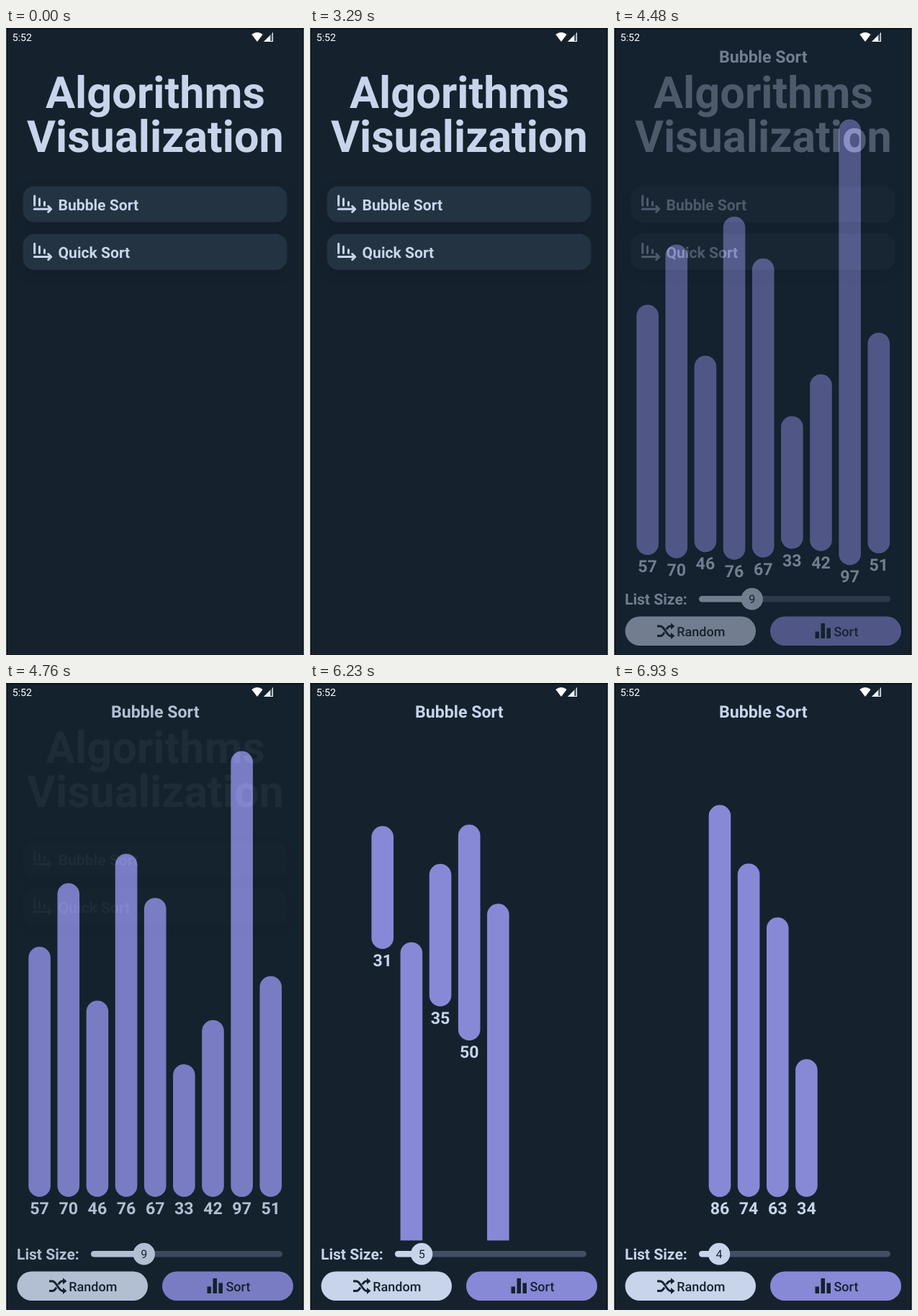
An HTML page for the animation above (8 s loop, 414x870 px).

```html
<!DOCTYPE html>
<html lang="en">
<head>
<meta charset="utf-8">
<title>Algorithms Visualization</title>
<style>
  html, body { margin: 0; width: 100%; height: 100%; overflow: hidden; background: #15222e; }
  svg { display: block; width: 414px; height: 870px; font-family: Roboto, Arial, sans-serif; text-rendering: geometricPrecision; }
  .bg { fill: #15222e; }
  .bold { font-weight: 700; fill: #c8d4ea; }
  .mid { text-anchor: middle; }
  .title { font-size: 61.2px; }
  .head, .value { font-size: 23.2px; }
  .row { font-size: 21.1px; }
  .card { fill: #243342; filter: drop-shadow(0 6px 7px rgba(8, 14, 24, .25)); }
  .icon { fill: none; stroke: #c8d4ea; stroke-width: 3; stroke-linecap: round; stroke-linejoin: round; }
  .btn { font-size: 18px; font-weight: 500; fill: #18222f; }
  .light { fill: #c8d4ea; }
  .accent { fill: #8789d7; }
  .dark { fill: #15222e; }
</style>
</head>
<body>
<svg viewBox="0 0 414 870">
  <defs>
    <clipPath id="area"><rect y="60" width="414" height="713.5"/></clipPath>
    <path id="chart" d="M39.700 233V246M46.500 237V246M53.500 241.500V246M39.300 251.300H62M58.700 247.300L62.700 251.300L58.700 255.300"/>
  </defs>

  <rect class="bg" width="414" height="870"/>

  <g id="home">
    <text class="bold title mid" x="207.400" y="111">Algorithms</text>
    <text class="bold title mid" x="207.400" y="172">Visualization</text>
    <rect class="card" x="23.500" y="219.500" width="367" height="50" rx="16"/>
    <rect class="card" x="23.500" y="285.700" width="367" height="50" rx="16"/>
    <use class="icon" href="#chart"/>
    <use class="icon" href="#chart" y="66.200"/>
    <text class="bold row" x="72.500" y="253">Bubble Sort</text>
    <text class="bold row" x="72.500" y="319.200">Quick Sort</text>
  </g>

  <g id="sorter" opacity="0">
    <rect class="bg" width="414" height="870"/>
    <text class="bold head mid" x="207.200" y="48">Bubble Sort</text>
    <g id="bars" clip-path="url(#area)"></g>

    <text class="bold row" x="15" y="800">List Size:</text>
    <rect x="118" y="788" width="266" height="8.500" rx="4.250" fill="#434e65"/>
    <rect id="fill" class="light" x="118" y="788" height="8.500" rx="4.250"/>
    <circle id="thumb" class="light" cy="792.300" r="15.200"/>
    <text id="size" class="dark mid" y="798" font-size="16"></text>

    <rect class="light" x="15.500" y="816.500" width="181.500" height="40.500" rx="20.250"/>
    <g fill="none" stroke="#18222f" stroke-width="2.900">
      <path d="M60 830H64.500C70 830 73 843.500 78.500 843.500H81M60 843.500H64.500C67 843.500 68.700 841 70 838.700M72.700 834.600C74.200 832 76 830 78.500 830H81"/>
      <path fill="#18222f" stroke="none" d="M79 825.500L84.500 830L79 834.500ZM79 839L84.500 843.500L79 848Z"/>
    </g>
    <text class="btn" x="87.300" y="843.500">Random</text>

    <rect class="accent" x="217" y="816.500" width="182" height="40.500" rx="20.250"/>
    <path class="dark" d="M279.500 837.500h5.500v9.500h-5.500zM287.500 826h5.500v21h-5.500zM295.500 832.500h5.500v14.500h-5.500z"/>
    <text class="btn" x="305.500" y="843.500">Sort</text>
  </g>

  <g fill="#fff">
    <text x="8.700" y="18.300" font-size="14.200">5:52</text>
    <path d="M341.300 9Q349 3 356.700 9L349 19Z"/>
    <path d="M371 6V19H358Z" opacity=".3"/>
    <path d="M367 10V19H358ZM370 6.500H371V19H367V18H370Z"/>
  </g>

  <path d="M0 1H414M1.500 0V870M412.500 0V870" stroke="#05090d" fill="none"/>
  <path d="M.5 1V870M413.500 1V870" stroke="#555c60"/>
</svg>

<script>
const LOOP = 8000, STEP = 70, FLOOR = 713, PITCH = 40.15, WIDTH = 30.6;
const STIFF = 0.023;

// Each list takes effect at its time; bars resize at once and glide to their new places.
const lists = [
  { at: 4276, v: [57, 70, 46, 76, 67, 33, 42, 97, 51] },
  { at: 5950, v: [80, 88, 72, 84, 31, 65, 70, 58] },
  { at: 6020, v: [62, 45, 90, 53, 71, 49, 82] },
  { at: 6090, v: [85, 57, 74, 85, 67, 38] },
  { at: 6230, v: [31, 78, 35, 50, 88] },
  { at: 6510, v: [86, 74, 63, 34] }
];

const $ = id => document.getElementById(id);
const height = v => 6.79 * v - 40;
const slot = (i, n) => 207.2 + (i - (n - 1) / 2) * PITCH;
const rest = ms => ms <= 0 ? 1 : (1 + STIFF * ms) * Math.exp(-STIFF * ms);

function make(tag, cls, parent) {
  const el = document.createElementNS('http://www.w3.org/2000/svg', tag);
  el.setAttribute('class', cls);
  return parent.appendChild(el);
}

function set(el, attrs) {
  for (const k in attrs) el.setAttribute(k, attrs[k]);
}

const bars = lists[0].v.map(() => {
  const g = make('g', '', $('bars'));
  const body = make('rect', 'accent', g);
  set(body, { x: -WIDTH / 2, width: WIDTH, rx: WIDTH / 2 });
  return { g, body, label: make('text', 'bold value mid', g) };
});

function place(i, t, last) {
  let x = slot(i, lists[0].v.length), y = FLOOR;
  for (let k = 0; k <= last; k++) {
    const { at, v } = lists[k];
    const end = k < last ? lists[k + 1].at : t;
    const r = rest(end - at);
    const tx = slot(i, v.length), ty = FLOOR - height(v[i]);
    x = tx + (x - tx) * r;
    y = ty + (y - ty) * r;
  }
  return [x, y];
}

function draw(t) {
  const u = Math.min(1, Math.max(0, (t - 4200) / 770));
  const fade = 1 - Math.pow(1 - u, 1.64);
  set($('home'), { opacity: 1 - 0.6 * fade });
  set($('sorter'), { opacity: fade });

  let last = 0;
  while (last + 1 < lists.length && lists[last + 1].at <= t) last++;
  const v = lists[last].v, n = v.length;

  bars.forEach(({ g, body, label }, i) => {
    set(g, { display: i < n ? 'inline' : 'none' });
    if (i >= n) return;
    const [x, y] = place(i, t, last), h = height(v[i]);
    set(g, { transform: `translate(${x.toFixed(2)} ${y.toFixed(2)})` });
    set(body, { height: h });
    set(label, { y: h + 24 });
    label.textContent = v[i];
  });

  const knob = 146 + 9.15 * (n - 4);
  set($('fill'), { width: knob - 118 });
  set($('thumb'), { cx: knob });
  set($('size'), { x: knob });
  $('size').textContent = n;
}

const start = performance.now();
function tick() {
  const t = (performance.now() - start) % LOOP;
  draw(Math.floor(t / STEP) * STEP);
  requestAnimationFrame(tick);
}
tick();
</script>
</body>
</html>
```
